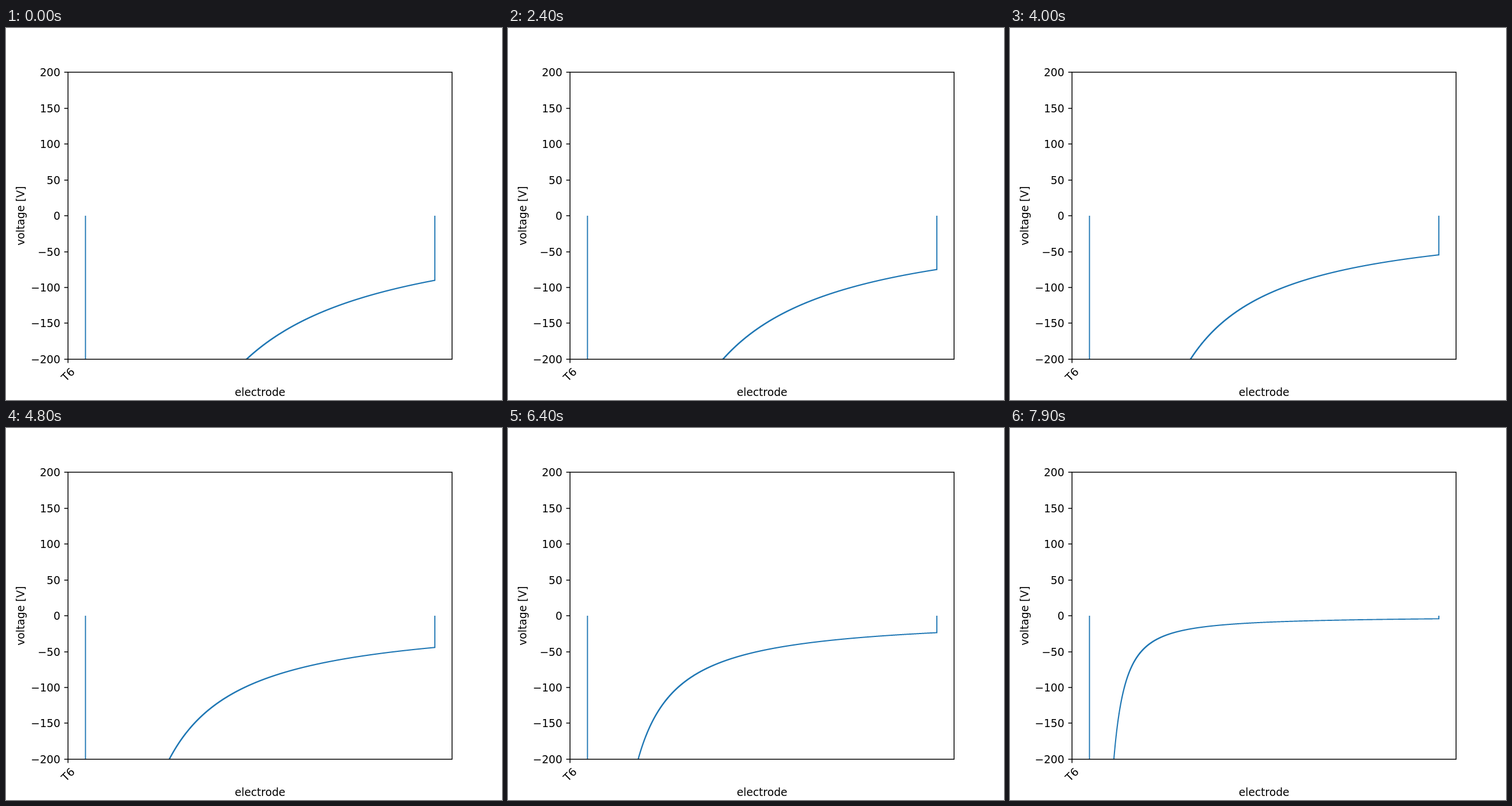
Recreate the animation shown at these times as an HTML page with a canvas. Size 864 by 648 pixels, loop 8000 ms.

```html
<!DOCTYPE html>
<html lang="en">
<head>
<meta charset="utf-8">
<title>Electrode voltage</title>
<style>
  html, body { margin: 0; width: 100%; height: 100%; overflow: hidden; background: #fff; }
  canvas { display: block; width: 864px; height: 648px; }
</style>
</head>
<body>
<canvas id="plot" width="864" height="648"></canvas>
<script>
const ctx = document.getElementById('plot').getContext('2d');
const box = { left: 108, top: 77, right: 777, bottom: 577 };
const LOOP = 8000, STEP = 100;
const X0 = 138.44, SPAN = 608.6, BINS = 3000;
const yOf = v => 327.1 - v * 1.249;

// Voltage size at the last electrode: constant acceleration, then constant rate.
function endVoltage(t) {
  const ramp = Math.min(t, 2.7);
  return 90 - ramp - 2.2 * ramp * ramp - 12.9 * Math.max(0, t - 2.7);
}

// Voltage size at relative position u (0 to 1): a far part that fades and a fixed near part.
function voltage(u, end) {
  const near = 0.185, shift = 0.017;
  if (u < 0.03) return 400;
  const far = (end - near) * (1 - shift) / (u - shift);
  return Math.min(400, far + near * Math.pow(u, -2.45));
}

function line(x1, y1, x2, y2) {
  ctx.beginPath();
  ctx.moveTo(x1, y1);
  ctx.lineTo(x2, y2);
  ctx.stroke();
}

function label(text, x, y, align = 'center', angle = 0, dy = 0) {
  ctx.save();
  ctx.translate(x, y);
  ctx.rotate(angle);
  ctx.textAlign = align;
  ctx.fillText(text, 0, dy);
  ctx.restore();
}

// Fine stairs with mitred corners, so slopes look heavier than level parts.
function drawStairs(t) {
  const end = endVoltage(t);
  ctx.save();
  ctx.beginPath();
  ctx.rect(box.left, box.top, box.right - box.left, box.bottom - box.top);
  ctx.clip();
  ctx.strokeStyle = '#1f77b4';
  ctx.lineWidth = 1.875;
  ctx.lineJoin = 'miter';
  ctx.beginPath();
  ctx.moveTo(X0, yOf(0));
  for (let i = 0; i < BINS; i++) {
    const y = yOf(-voltage((i + 0.5) / BINS, end));
    ctx.lineTo(X0 + SPAN * i / BINS, y);
    ctx.lineTo(X0 + SPAN * (i + 1) / BINS, y);
  }
  ctx.lineTo(X0 + SPAN, yOf(0));
  ctx.stroke();
  ctx.restore();
}

function drawAxes() {
  ctx.strokeStyle = ctx.fillStyle = '#000';
  ctx.lineWidth = 1.5;
  ctx.font = '18.75px "DejaVu Sans", sans-serif';
  ctx.textBaseline = 'alphabetic';
  ctx.strokeRect(box.left, box.top, box.right - box.left, box.bottom - box.top);
  for (let v = -200; v <= 200; v += 50) {
    const y = Math.round(yOf(v));
    line(box.left - 6.56, y, box.left, y);
    label(String(v).replace('-', '\u2212'), 94.7, Math.round(yOf(v) + 7), 'right');
  }
  line(box.left, box.bottom, box.left, box.bottom + 6.56);
  label('T6', 107.7, 603.5, 'center', -Math.PI / 4, 6.85);
  label('electrode', 442.5, 641);
  label('voltage [V]', 31.5, 327.1, 'center', -Math.PI / 2);
}

const start = performance.now();
function frame(now) {
  const ms = Math.max(0, now - start) % LOOP;
  ctx.fillStyle = '#fff';
  ctx.fillRect(0, 0, 864, 648);
  drawStairs(Math.floor(ms / STEP) * STEP / 1000);
  drawAxes();
  requestAnimationFrame(frame);
}
frame(start);
</script>
</body>
</html>
```
